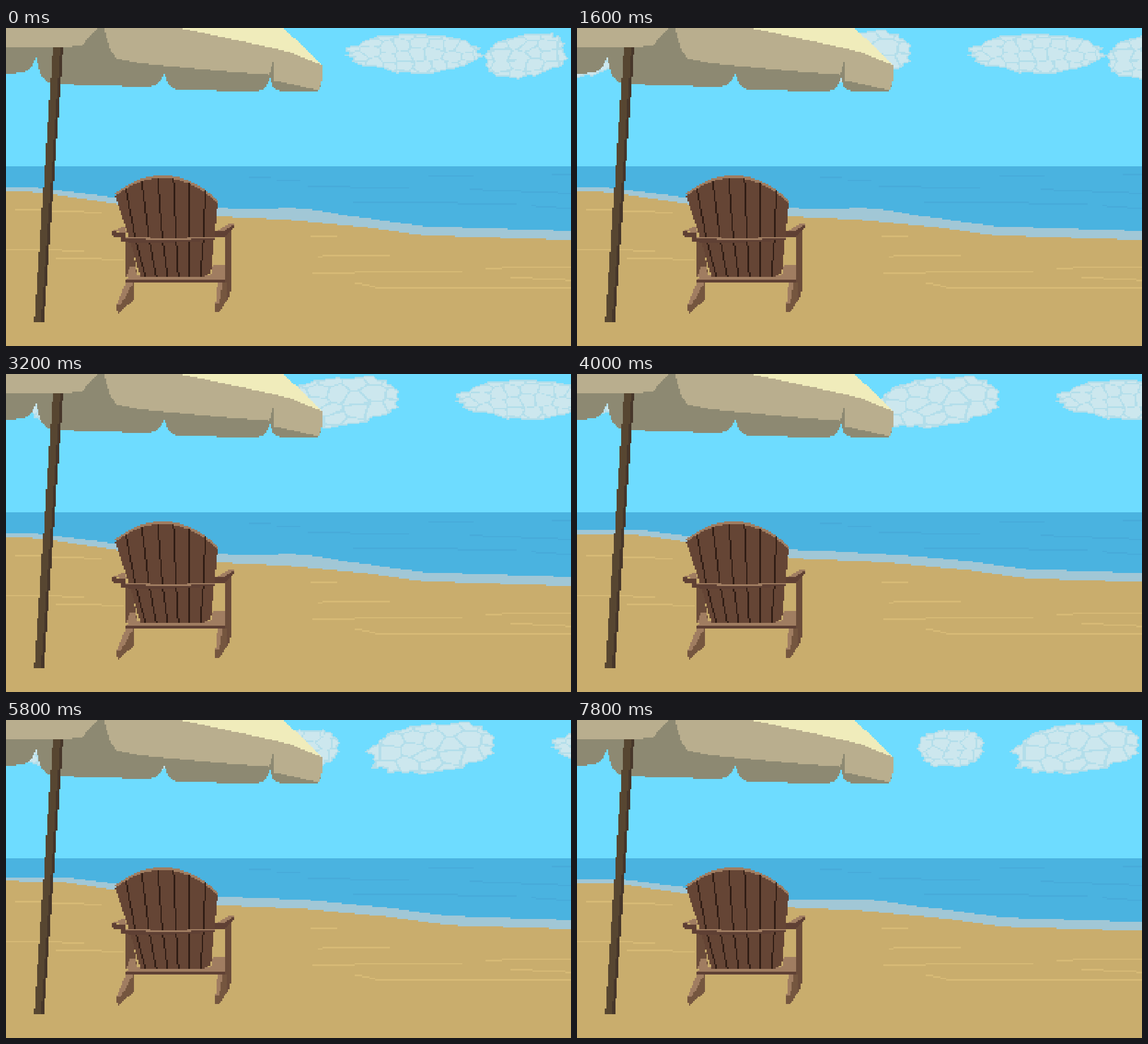
Write an HTML page with a canvas that moves like this. It is 998 by 561 pixels and loops after 8 s.

```html
<!DOCTYPE html>
<html lang="en">
<head>
<meta charset="utf-8">
<title>Beach</title>
<style>
  html, body { margin: 0; width: 100%; height: 100%; overflow: hidden; background: #6edcff; }
  canvas { display: block; width: 100vw; height: 100vh; image-rendering: pixelated; }
</style>
</head>
<body>
<canvas id="stage" width="384" height="216"></canvas>
<script>
const W = 384, H = 216, SCALE = 998 / W;
const STEP_MS = 200, STEPS = 40;

const layer = () => Object.assign(document.createElement('canvas'), { width: W, height: H });
const range = (n, f) => Array.from({ length: n }, (_, i) => f(i));
const lerp = (a, b, t) => a + (b - a) * t;
const hash = (a, b) => {
  const v = Math.sin(a * 127.1 + b * 311.7) * 43758.5453;
  return v - Math.floor(v);
};

// Shapes are given in stage pixels, as "x,y x,y" or as pairs.
const toCells = shape =>
  (typeof shape === 'string' ? shape.split(' ').map(p => p.split(',').map(Number)) : shape)
    .map(([x, y]) => [x / SCALE, y / SCALE]);

// Scanline fill without smoothing.
function fill(g, shape, color) {
  const pts = toCells(shape);
  g.fillStyle = color;
  for (let row = 0; row < H; row++) {
    const y = row + 0.5, hits = [];
    pts.forEach(([x1, y1], i) => {
      const [x2, y2] = pts[(i + 1) % pts.length];
      if ((y1 <= y) !== (y2 <= y)) hits.push(lerp(x1, x2, (y - y1) / (y2 - y1)));
    });
    hits.sort((a, b) => a - b);
    for (let i = 0; i + 1 < hits.length; i += 2) {
      const from = Math.round(hits[i]), to = Math.round(hits[i + 1]);
      if (to > from) g.fillRect(from, row, to - from, 1);
    }
  }
}

function line(g, shape, color) {
  const pts = toCells(shape);
  g.fillStyle = color;
  for (let i = 0; i + 1 < pts.length; i++) {
    const [x1, y1] = pts[i], [x2, y2] = pts[i + 1];
    const n = Math.ceil(Math.max(Math.abs(x2 - x1), Math.abs(y2 - y1), 1));
    for (let k = 0; k <= n; k++) {
      g.fillRect(Math.floor(lerp(x1, x2, k / n)), Math.floor(lerp(y1, y2, k / n)), 1, 1);
    }
  }
}

// True where a cell lies on the border between two jittered blocks.
function onCrack(x, y, blockW, blockH) {
  const u = x / blockW, v = y / blockH, d = [];
  for (let i = -1; i <= 1; i++) for (let j = -1; j <= 1; j++) {
    const cx = Math.floor(u) + i, cy = Math.floor(v) + j;
    const px = cx + 0.15 + 0.7 * hash(cx, cy), py = cy + 0.15 + 0.7 * hash(cy + 9, cx + 4);
    d.push(Math.hypot(px - u, py - v));
  }
  d.sort((a, b) => a - b);
  return d[1] - d[0] < 0.1;
}

// A ragged superellipse; a lower power gives squarer ends, lift raises the right side.
function cloud(g, { x, y, rx, ry, power, lift, block }) {
  const bend = v => Math.sign(v) * Math.abs(v) ** power;
  const outline = range(45, i => {
    const a = i % 44 / 44 * 2 * Math.PI, r = 1 - 0.16 * hash(i % 44, rx);
    const dx = bend(Math.cos(a)) * r;
    return [x + rx * dx, y + ry * bend(Math.sin(a)) * r - lift * dx];
  });
  const edge = '#b3deea', own = layer(), c = own.getContext('2d');
  fill(c, outline, '#cce7ee');
  c.globalCompositeOperation = 'source-atop';
  c.fillStyle = edge;
  const left = Math.floor((x - rx) / SCALE);
  for (let px = left; px < left + 2 * rx / SCALE; px++) for (let py = 0; py < 40; py++) {
    if (onCrack(px, py, block, block * 0.65)) c.fillRect(px, py, 1, 1);
  }
  c.globalCompositeOperation = 'source-over';
  line(c, outline, edge);
  g.drawImage(own, 0, 0);
}

function drawClouds(g) {
  cloud(g, { x: 722, y: 44, rx: 127, ry: 37, power: 1.1, lift: 0, block: 11 });
  cloud(g, { x: 920, y: 49, rx: 74, ry: 39, power: 0.8, lift: 10, block: 11 });
  cloud(g, { x: 390, y: 50, rx: 119, ry: 44, power: 0.85, lift: 14, block: 14 });
  cloud(g, { x: 167, y: 50, rx: 60, ry: 34, power: 0.75, lift: 2, block: 10 });
}

function drawSea(g) {
  g.fillStyle = '#6edcff';
  g.fillRect(0, 0, W, H);
  g.fillStyle = '#4ab3e0';
  g.fillRect(0, 94, W, H);
  ['430,263 467,263', '480,268 518,268', '533,279 710,283', '748,262 824,261',
   '820,285 998,292', '965,258 998,258', '615,308 900,310', '930,314 998,319']
    .forEach(s => line(g, s, '#47abda'));
}

function drawSandLines(g) {
  ['16,320 168,326', '2,391 137,393', '89,406 207,409', '538,367 584,367', '551,403 678,401',
   '543,432 805,430', '848,425 905,422 998,422', '892,440 998,445', '617,450 655,458 998,458']
    .forEach(s => line(g, s, '#d7ba76'));
}

// Lower rim of the cloth between two notches, each given as [x, notchY, hemY].
const flap = ([x1, top1, hem1], [x2, top2, hem2]) => range(41, i => {
  const s = i / 40, hang = 1 - Math.abs(2 * s - 1) ** 13;
  return [lerp(x1, x2, s), lerp(lerp(top1, top2, s), lerp(hem1, hem2, s), hang)];
});

function drawUmbrella(g) {
  const tan = '#b9ae8e', dark = '#8d8972';
  const notches = [[-180, 52, 80], [53, 52, 80], [280, 78, 105], [467, 86, 112], [558, 90, 113]];
  const rim = notches.slice(1).flatMap((n, i) =>
    flap([notches[i][0], notches[i][1], i === 1 ? 98 : n[2] - 3], n));
  fill(g, [[558, 66], [490, 0], [-180, 0], ...rim], dark);
  fill(g, '0,0 163,0 150,12 135,30 105,34 0,35', tan);
  fill(g, '173,0 490,0 558,66 474,52 465,82 380,76 235,62 196,54 184,38', tan);
  fill(g, '474,48 558,64 558,92 552,110 473,92', tan);
  fill(g, '307,0 490,0 522,30 558,66 500,42 420,24', '#f0ecbb');
  fill(g, '83,34 101,34 67,519 50,519', '#574631');
  fill(g, '96,34 101,34 67,519 62,519', '#46362a');
}

function drawChair(g) {
  const light = '#a07d61', mid = '#75563f', dark = '#5f4034', wood = '#654535', gap = '#2f1c14';
  const bar = (x, y, w, h, color) => fill(g, [[x, y], [x + w, y], [x + w, y + h], [x, y + h]], color);

  // Posts, legs and seat
  fill(g, '210,376 222,376 232,440 210,440', '#6b4c3a');
  fill(g, '219,420 227,420 232,440 213,440', light);
  fill(g, '387,358 397,356 397,464 392,480 387,482', '#6b4c3a');
  fill(g, '211,449 226,449 203,488 195,490', light);
  fill(g, '225,449 225,480 197,506 195,490 203,488', mid);
  fill(g, '374,449 383,449 377,486 370,486', light);
  fill(g, '383,449 390,449 390,480 378,500 370,503 370,486 377,486', mid);
  fill(g, '216,437 362,437 366,418 388,418 388,444 213,444', light);
  bar(211, 444, 177, 5, dark);

  // Back: an arched rim over tapering slats
  const arch = drop => range(21, i => {
    const s = i / 20;
    return [lerp(193, 374, s), 260 + drop + 38 * Math.abs(2 * s - 0.92) ** 2.1];
  });
  fill(g, [...arch(0), [373, 320], [200, 320]], light);
  fill(g, [...arch(5), [372, 330], [362, 432], [350, 439], [237, 439], [218, 372]], wood);
  for (let i = 0; i < 6; i++) {
    const top = 266 + 3.3 * (i - 2.4) ** 2;
    line(g, [[212 + 28 * i, top], [228 + 24.2 * i, 370], [246 + 19.5 * i, 437]], gap);
  }

  // Rail and arms
  fill(g, '203,370 285,374 370,370 370,374 285,379 203,378', dark);
  fill(g, '210,368 285,372 368,368 368,371 285,375 210,371', light);
  fill(g, '187,359 205,351 211,350 212,361', light);
  fill(g, '187,359 211,362 211,370 203,370 187,367', dark);
  fill(g, '370,359 395,346 403,346 385,360', light);
  fill(g, '370,359 385,359 403,346 403,353 386,368 370,368', dark);
}

const BEACH = [[-60, 283], [100, 286], [193, 300], [374, 327], [535, 334], [680, 348], [780, 362], [1060, 371]];

function beachAt(x) {
  const i = BEACH.findIndex(p => p[0] > x);
  const [x1, y1] = BEACH[i - 1], [x2, y2] = BEACH[i];
  return lerp(y1, y2, (x - x1) / (x2 - x1));
}

// The tide slides the waterline sideways and down; the foam swells in the middle.
function drawShore(g, tide) {
  const sand = x => beachAt(x + 42 * tide) + 4 * tide;
  const foam = x => sand(x) - 7 - 9 * Math.min(1, x / 430) - 6 * tide * Math.exp(-(((x - 530) / 60) ** 2));
  const below = edge => [...range(101, i => [i * 9.98, edge(i * 9.98)]), [998, 561], [0, 561]];
  fill(g, below(foam), '#a1c7d6');
  fill(g, below(sand), '#c9ad6d');
}

const paint = (...draws) => {
  const c = layer();
  draws.forEach(draw => draw(c.getContext('2d')));
  return c;
};
const back = paint(drawSea);
const clouds = paint(drawClouds);
const front = paint(drawSandLines, drawUmbrella, drawChair);
const ctx = document.getElementById('stage').getContext('2d');
let shown = -1;

function render(step) {
  const drift = 5 * Math.max(0, step - 1) % W;
  const tide = (Math.abs(step % 8 - 4) - 1) / 3;
  ctx.drawImage(back, 0, 0);
  ctx.drawImage(clouds, drift, 0);
  ctx.drawImage(clouds, drift - W, 0);
  drawShore(ctx, tide);
  ctx.drawImage(front, 0, 0);
}

function tick() {
  const step = Math.floor(performance.now() / STEP_MS) % STEPS;
  if (step !== shown) render(shown = step);
  requestAnimationFrame(tick);
}
tick();
</script>
</body>
</html>
```
